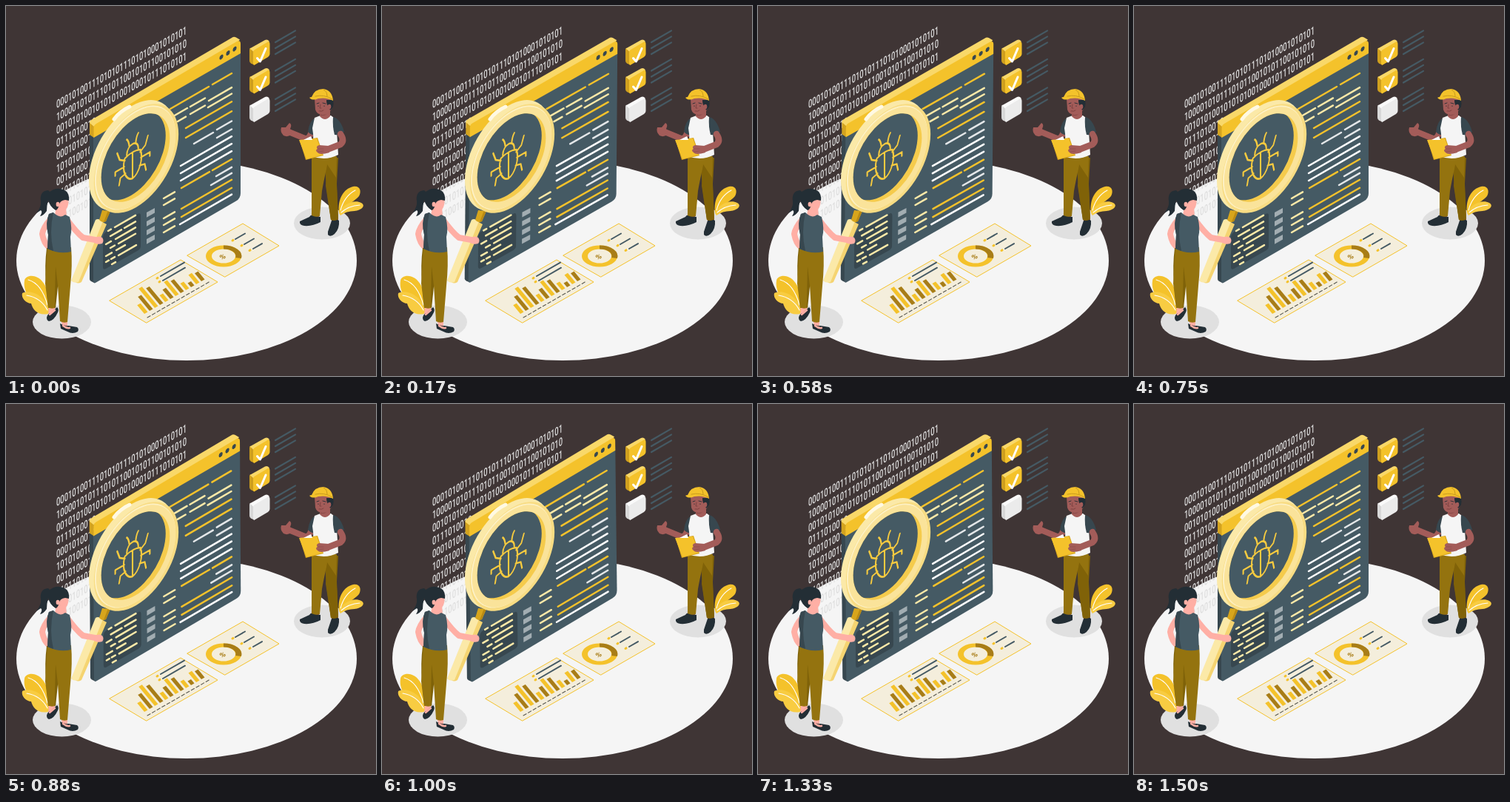
Recreate the animation shown at these times as an HTML page. Size 500x500 px, loop 1540 ms.

```html
<!DOCTYPE html>
<html lang="en">
<head>
<meta charset="utf-8">
<title>Bug hunting</title>
<style>
html, body { margin: 0; width: 100%; height: 100%; overflow: hidden; background: #3f3535; }
svg { display: block; width: 100%; height: 100%; }
text { font-family: Roboto, Arial, sans-serif; }
.line { fill: none; stroke-linecap: round; stroke-linejoin: round; }
</style>
</head>
<body>
<svg id="stage" viewBox="0 0 500 500"></svg>
<script>
const YELLOW = '#f4c22b', CREAM = '#fbe9a8', GOLD = '#a87d17', SLATE = '#455a64', DARK = '#37474f',
      INK = '#232e35', OLIVE = '#94730f', PINK = '#ffafa5', BROWN = '#a35c59', PALE = '#f5f5f5';
const SLOPE = 0.577;

const fill = (color, d) => `<path fill="${color}" d="${d}"/>`;
const line = (color, width, d) => `<path class="line" stroke="${color}" stroke-width="${width}" d="${d}"/>`;
const ellipse = (color, x, y, rx, ry) => `<ellipse fill="${color}" cx="${x}" cy="${y}" rx="${rx}" ry="${ry}"/>`;
const wall = (x, y, body) => `<g transform="matrix(.866 -.5 0 1 ${x} ${y})">${body}</g>`;
const disc = (color, x, y, r) => wall(x, y, `<circle r="${r}" fill="${color}"/>`);
// Strokes climbing along the wall: [x, y, run]
const strokes = (color, width, list) =>
  line(color, width, list.map(([x, y, run]) => `M${x} ${y}l${run} ${-run * SLOPE}`).join(''));

function binary() {
  const rows = ['000101001110101011101010001010101', '100001010111010110010101100101010',
    '001010100101010100100010111010101', '0111010010', '0001010010', '1010100101', '0010100011',
    '0101101010', '1100101011', '0011001010'];
  return rows.map((row, i) =>
    `<text transform="matrix(.61 -.35 0 1 68 ${138.5 + i * 17.5})" font-size="15.4" font-weight="500" fill="#dedede">${row}</text>`).join('');
}

function browser() {
  const code = [[147, 299, 28], [138, 304, 4], [141, 311, 15], [160, 300, 15], [135, 322, 7], [148, 315, 27],
    [141, 327, 6], [152, 321, 23], [135, 338, 8], [149, 330, 12], [142, 342, 5], [152, 337, 24], [135, 346, 4], [143, 349, 5]];
  return fill(DARK, 'M113 172L120 176V374.500L115 372Q113 371 113 369Z')
    + fill(SLATE, 'M118 174L317 59V253Q317 260 311 263.500L121 374Q118 375 118 371Z')
    + fill('#d3a31f', 'M113 158Q113 155 116 157L119 162V178L113 174Z')
    + fill('#f9d869', 'M113 158Q113 155 116 153.500L305 43Q308 41 311 42.500L316 45.500L311 51L119 163Z')
    + fill(YELLOW, 'M118.500 165Q118.500 161 122 159L311 48.500Q317 45 317 51V64L118.500 178Z')
    + [[291, 69], [300, 63.5], [309, 58]].map(([x, y]) => disc(DARK, x, y, 3)).join('')
    + strokes(YELLOW, 2.5, [[222, 139, 52], [279, 106, 26], [243, 165, 62], [243, 178, 62], [237, 246, 38],
        [279, 222, 26], [237, 274, 68], [237, 285, 68]])
    + strokes(CREAM, 2.5, [[226, 149, 19], [249, 136, 20], [274, 128, 31], [232, 156, 11], [249, 146, 20], [273, 137, 32],
        [213, 260, 15], [213, 269, 15], [213, 287, 15], [213, 296, 15], [213, 306, 15]])
    + strokes('#e4e7e9', 2.5, [[285, 167, 20], [254, 186, 26], [285, 178, 20], [284, 230, 21], [277, 242, 28]])
    + strokes('#fff', 2.5, [[236, 216, 69], [236, 226, 69], [236, 236, 69], [235, 295, 70]])
    + [279, 291, 303, 315].map(y => fill('#a2adb2', `M190 ${y}l11 -6v6.500l-11 6.300Z`)).join('')
    + fill(DARK, 'M131 313Q131 308 135 305.500L178 281Q182 279 182 283V325Q182 328 179 330L135 355Q131 357 131 353Z')
    + strokes(CREAM, 2.5, code);
}

function bug() {
  const half = s => `M${s * 12} -2L${s * 20} -7L${s * 24} -18M${s * 13} 6H${s * 27}V11M${s * 11} 16L${s * 19} 18L${s * 21} 27`
    + `M${s * 5} -18Q${s * 6} -26 ${s * 9} -29`;
  return wall(171, 205, line('#f7cb3f', 2.4, 'M-12 -5C-18 10 -9 27 0 28C9 27 18 10 12 -5Q0 -10 -12 -5ZM0 -7V28'
    + 'M-9 -8C-9 -22 9 -22 9 -8' + half(-1) + half(1)));
}

function magnifier() {
  return fill('#f5d471', 'M127 290L136 295L102 373Q97 376 94 373Z')
    + fill(CREAM, 'M121 289Q125 286 131 291L98 373Q91 375 88 371Z')
    + fill('#d7a51c', 'M130 276L141 277L135 291Q130 294 126 289Z')
    + fill('#b98a14', 'M138 276L141 277L135 291L132 292Z')
    + disc(CREAM, 170, 202, 67)
    + disc('#f8dc83', 176, 206, 66)
    + disc('#fdf1c5', 174.5, 205, 63)
    + disc('#fae39a', 175.5, 205.500, 62)
    + disc('#f5cb4c', 175, 205, 53.5)
    + `<clipPath id="hole">${'<circle transform="matrix(.866 -.5 0 1 175 205)" r="53.5"/>'}</clipPath>`
    + `<g clip-path="url(#hole)">${disc(SLATE, 169, 202, 54)}</g>`
    + line('#fff9e3', 5, 'M146 153Q154 142 167 136')
    + bug();
}

function chart() {
  const heights = [13, 21, 29, 25, 10, 14, 21, 18, 10, 6, 14, 12];
  const bars = heights.map((h, i) => {
    const x = 187 + i * 7, y = 416 - i * 4;
    return fill(i % 2 ? GOLD : YELLOW, `M${x} ${y}l${-h * .75} ${-h * .9}l4.500 -2.600l${h * .75} ${h * .9}Z`);
  }).join('');
  const ticks = [...Array(13)].map((_, i) => [191 + i * 6.6, 421 - i * 3.8, 4]);
  return line(YELLOW, 1, 'M140 398L236 343L286 373L190 428Z').replace('<path', '<path style="fill:#f4eedc"')
    + bars + strokes('#5a5a50', 1.1, ticks)
    + strokes(SLATE, 2, [[209, 365, 32], [212, 371, 30]])
    + strokes(YELLOW, 3, [[204, 368, 1], [207, 373, 1]]);
}

function share() {
  const ring = (color, d) => `<path fill="none" stroke="${color}" stroke-width="8" d="${d}"/>`;
  return line(YELLOW, 1, 'M245 337L320 294L369 324L296 366Z').replace('<path', '<path style="fill:#f4eedc"')
    + `<g transform="matrix(1 0 0 .6 294 338)">${ring(YELLOW, 'M-20 0A20 20 0 1 0 20 0A20 20 0 1 0 -20 0')}${ring(GOLD, 'M0 -20A20 20 0 0 1 20 4')}</g>`
    + `<text transform="matrix(.866 -.5 .35 .8 290.500 344)" font-size="11" font-weight="700" fill="${GOLD}">%</text>`
    + strokes(SLATE, 2, [[310, 315, 13], [322, 322, 13], [334, 328, 12]])
    + strokes(YELLOW, 3, [[306, 317, 1], [318, 324, 1], [329, 330.5, 1]]);
}

function checkbox(y, front, top, side, ticked) {
  return `<g transform="translate(0 ${y})">`
    + fill(side, 'M329 59Q329 56 332 57L336 60V80L331 77.500Q329 76 329 74Z')
    + fill(top, 'M329.500 57.500L350 46Q352 45 354 46L356 48L336 63Z')
    + fill(front, 'M334 63Q334 60 337 58.500L353 49Q356.500 47 356.500 51V65Q356.500 67 354 69L337 79Q334 81 334 77Z')
    + (ticked ? line('#fff', 3, 'M339.500 70.500L343.500 75L351 57.500') : '')
    + strokes(SLATE, 2.2, [[364, 49, 27], [364, 57, 27], [364, 65, 27]]) + '</g>';
}

function plants() {
  return fill(YELLOW, 'M55 413C38 408 22 388 25 371C26 363 44 360 53 378Q61 394 58 415Z')
    + fill('#f8cc42', 'M57 416C43 419 36 410 34 402C28 402 20 395 22 388C34 382 52 392 58 409Z')
    + line('#fff', 1.1, 'M30 370Q48 375 56 404M28 391Q47 394 56 411')
    + fill(YELLOW, 'M450 279C448 261 456 247 469 244C478 242 481 250 477 257C471 264 463 266 452 280Z')
    + fill('#f8cc42', 'M450 280C455 268 470 261 480 266C487 270 480 276 471 277Q460 277 452 283Z')
    + line('#fff', 1.1, 'M452 276Q457 257 472 249M453 279Q463 270 478 269');
}

function woman() {
  return line(PINK, 8, 'M60 288Q50 300 49 308Q51 320 58 326')
    + fill(PINK, 'M58 402H67L66 414L57 419ZM74 420H83V433H76Z')
    + fill(INK, 'M55 421Q56 416 60 415L69 407Q72 410 70 414Q65 425 58 426Q55 425 55 421ZM73 429Q79 433 84 432L96 434Q99 436 97 440Q90 444 83 440L74 436Z')
    + line(PINK, 2.4, 'M59 417L66 411M77 432Q82 436 86 435')
    + fill('#7f6209', 'M55 327L76 329L71 370L67 408L57 408L54 376Q52 350 55 327Z')
    + fill(OLIVE, 'M56 326H88Q90 349 87 378L83 427Q78 429 73 426L70 378L67 352Q66 389 66 408Q61 410 57 407L53 375Z')
    + line(PINK, 8, 'M82 288Q95 306 104 313L126 317')
    + fill(PINK, 'M68 270H81L82 288Q74 292 66 283ZM120 313Q126 310 130 313Q133 317 130 321Q124 323 119 320Z')
    + fill(SLATE, 'M64 279Q73 288 80 282L86 285Q90 301 87 312L88 332Q72 336 56 328L57 309Q53 293 58 281Z')
    + fill(DARK, 'M64 279L58 281Q53 293 57 309L56 328L64 331Q58 306 64 279Z')
    + fill(PINK, 'M68 256Q77 249 84 257Q86 269 81 275Q74 279 68 273Z')
    + fill(INK, 'M59 251Q70 243 81 250Q86 254 85 263L80 262Q73 263 72 268Q70 276 67 276Q59 271 57 262Q55 270 55 277Q50 284 46 284Q50 278 47 276L41 280Q48 271 47 264Q45 250 57 249Z')
    + ellipse(PINK, 70, 268, 2.4, 3.2);
}

function man() {
  return fill(BROWN, 'M413 280H423V290H412ZM440 285H449V296H440Z')
    + fill(INK, 'M397 291L410 285Q412 281 417 284L425 285V292Q414 298 403 297Q396 296 397 291ZM435 305L440 290Q445 286 450 290Q451 301 444 308Q438 313 435 309Z')
    + fill('#806208', 'M430 205H449L447 240L449 288Q445 291 439 289L433 246Z')
    + fill(OLIVE, 'M413 203H447L446 239Q437 240 434 216Q429 238 427 250L424 284Q418 286 413 283L413 245Z')
    + fill('#806208', 'M434 214L446 232L447 245L449 288Q445 291 439 289L432 243Z')
    + line(BROWN, 8, 'M413 169Q410 180 404 179L382 170')
    + fill(BROWN, 'M372 164L378 164L383 158Q387 160 384 166L387 173Q381 178 375 175Q370 170 372 164Z')
    + fill(DARK, 'M418 151Q410 155 408 170Q412 175 418 174Z')
    + fill(PALE, 'M417 151L425 148H439L446 153L449 201Q432 210 413 203Q417 180 414 165Z')
    + fill(BROWN, 'M424 142H438V149Q431 157 424 149Z')
    + fill('#8d4d4b', 'M424 144L437 141Q432 150 425 148Z')
    + fill(BROWN, 'M417 125Q428 119 441 126V137Q437 147 428 147Q420 147 418 140Z')
    + fill(INK, 'M433 127H442Q444 137 438 141L436 135Q433 134 433 127Z')
    + ellipse(BROWN, 437, 136, 2.3, 3.2)
    + line(INK, .9, 'M420 132L423 131M428 131L432 132M422 135V135.500M430 135V135.500')
    + line('#753b3b', .8, 'M425 133L424 138H426M423 142Q427 143 429 141')
    + fill(YELLOW, 'M413 123Q417 112 429 112Q441 114 442 128Q433 123 422 125Q415 128 411 125Q409 123 413 123Z')
    + line('#c99b1d', 1, 'M418 122Q430 119 441 126M429 113Q434 115 434 122')
    + fill(DARK, 'M442 150Q452 152 457 170Q452 175 444 174Q441 163 442 150Z')
    + fill('#d7a51c', 'M397 182L421 178L429 202L405 208Z')
    + fill(YELLOW, 'M396 181L420 179L428 201L406 207Z')
    + fill('#fff', 'M402 181L412 176L414 181Z')
    + line(BROWN, 8.5, 'M452 173Q458 182 452 187L434 194')
    + fill(BROWN, 'M436 189L423 188Q418 190 421 193Q417 195 421 198Q424 202 437 198Z')
    + line('#8d4d4b', .7, 'M421 193L429 193M422 197L429 196');
}

const stage = document.getElementById('stage');
stage.innerHTML = ellipse(PALE, 244, 344, 230, 135) + binary()
  + `<g id="browser">${browser()}</g>`
  + ellipse('#e0e0e0', 75.5, 427, 39.5, 22.5) + ellipse('#e0e0e0', 427, 293.5, 38, 22)
  + plants() + chart() + share() + magnifier() + woman()
  + checkbox(0, YELLOW, '#f9d869', '#cf9f1e', true)
  + checkbox(38.5, YELLOW, '#f9d869', '#cf9f1e', true)
  + checkbox(77, '#ebebeb', '#fafafa', '#d8d8d8', false)
  + man();

// Sway: 0 to 1 to -1 to 0 degrees, linear, with a short rest before repeating.
const LOOP = 1540, SWAY = 1500;
const panel = document.getElementById('browser');
function angleAt(ms) {
  const p = Math.min(ms % LOOP, SWAY) / SWAY;
  return p < .25 ? 4 * p : p < .75 ? 2 - 4 * p : 4 * p - 4;
}
function draw() {
  panel.setAttribute('transform', `rotate(${angleAt(performance.now())} 215 208)`);
  requestAnimationFrame(draw);
}
draw();
</script>
</body>
</html>
```
